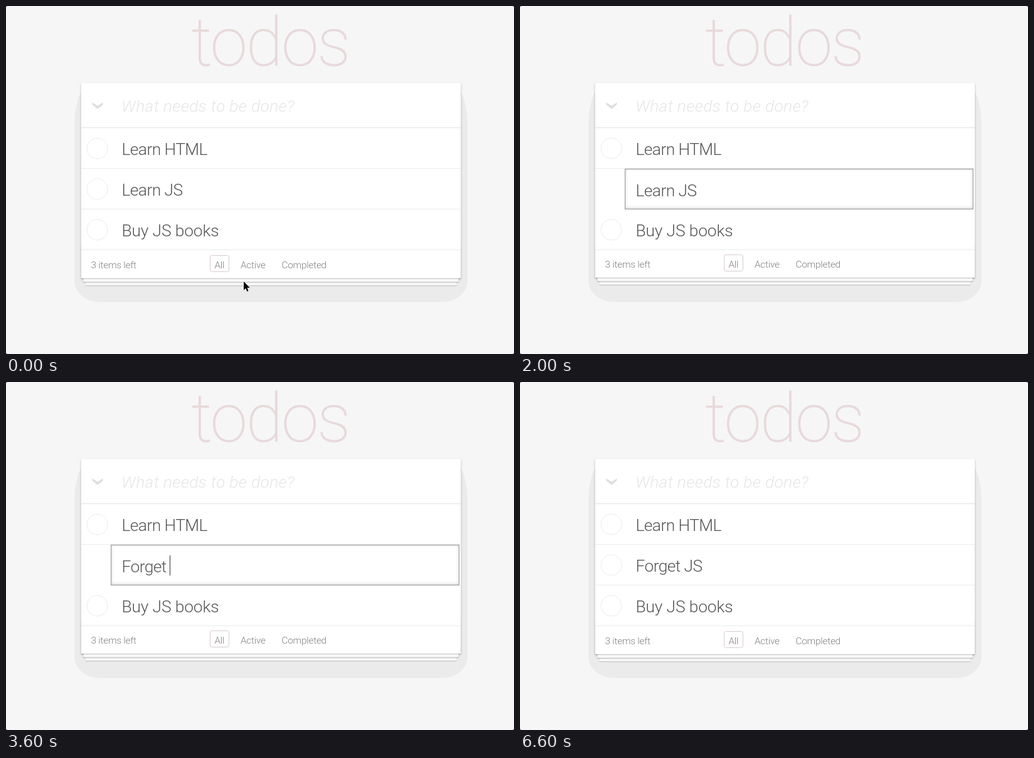
Animation, 810 px wide and 556 px high, one loop 6900 ms. Source, as an HTML page:

```html
<!DOCTYPE html>
<html lang="en">
<head>
<meta charset="utf-8">
<title>todos</title>
<style>
  html, body { margin: 0; width: 100%; height: 100%; overflow: hidden; background: #555; }
  #stage { position: relative; width: 810px; height: 556px; overflow: hidden; background: #f6f6f6; border-radius: 3px; }
  #stage > * { position: absolute; }
  #halo { left: 109px; top: 135px; width: 627px; height: 338px; background: #ebebeb; border-radius: 16px 16px 40px 40px / 60px 60px 34px 34px; }
  #card { left: 120px; top: 123px; width: 605px; height: 312px; background: #fff; box-shadow: 0 2px 4px rgba(0, 0, 0, .2); }
  #sheets {
    position: absolute; left: 0; right: 0; bottom: 0; height: 55px;
    box-shadow: 0 1px 1px rgba(0, 0, 0, .2), 0 9px 0 -3.3px #f8f8f8, 0 10px 1px -3.3px rgba(0, 0, 0, .2),
      0 17.6px 0 -6.6px #f8f8f8, 0 18.7px 2px -6.6px rgba(0, 0, 0, .2);
  }
  #face { position: absolute; inset: 0; background: #fff; }
  #edit {
    box-sizing: border-box; left: 167px; top: 260px; width: 556px; height: 65px; background: #fff;
    border: 1px solid #999; box-shadow: inset 0 -1px 5px rgba(0, 0, 0, .2);
  }
  svg { left: 0; top: 0; }
  text { font-family: Roboto, "Liberation Sans", sans-serif; font-weight: 300; white-space: pre; }
  .title { font-size: 107px; font-weight: 100; letter-spacing: -2px; fill: #e8d9db; stroke: #e8d9db; stroke-width: .8; }
  .hint { font-size: 26.4px; font-style: italic; letter-spacing: .3px; fill: #e6e6e6; }
  .item { font-size: 26.4px; letter-spacing: -.6px; fill: #555; }
  .loose { letter-spacing: -.15px; }
  .foot { font-size: 15.4px; letter-spacing: -.25px; fill: #808080; }
  .line { stroke: #ebebeb; }
  .ring { fill: none; stroke: #ececec; }
</style>
</head>
<body>
<div id="stage">
  <div id="halo"></div>
  <div id="card"><div id="sheets"></div><div id="face"></div></div>
  <svg width="810" height="556">
    <text class="title" x="295" y="95">todos</text>
    <path d="M137.5 154L146 159.5L154.5 154V157.5L146 164.5L137.5 157.5Z" fill="#dedede"/>
    <text class="hint" x="184" y="169">What needs to be done?</text>
    <path d="M120 194.5H725" stroke="#e0e0e0"/>
    <path class="line" d="M120 259.5H725M120 389.5H725"/>
    <path class="line" id="midLine" d="M120 324.5H725"/>
    <circle class="ring" cx="145.5" cy="227.5" r="16.5"/>
    <circle class="ring" id="midRing" cx="145.5" cy="292.5" r="16.5"/>
    <circle class="ring" cx="145.5" cy="357.5" r="16.5"/>
    <text class="item" x="184.5" y="237.5">Learn HTML</text>
    <text class="item loose" x="184.5" y="367.5">Buy JS books</text>
    <g id="footer">
      <text class="foot" x="135.5" y="418.5">3 items left</text>
      <rect x="325.5" y="398.5" width="30" height="26" rx="3" fill="none" stroke="#d9cccc"/>
      <text class="foot" x="332.5" y="418.5">All</text>
      <text class="foot" x="374" y="418.5">Active</text>
      <text class="foot" x="439.5" y="418.5">Completed</text>
    </g>
  </svg>
  <div id="edit"></div>
  <svg width="810" height="556">
    <rect id="mark" height="32" fill="#b9d6fb"/>
    <text class="item" id="label" x="184.5"></text>
    <path id="newCaret" d="M185.5 143V175" stroke="#4d4d4d"/>
    <path id="caret" d="M0 277V309" stroke="#333"/>
    <path id="cross" d="M-7 -7L7 7M7 -7L-7 7" stroke="#b3a6a6" stroke-width="1.3"/>
    <path id="arrow" d="M0 0V14L3.2 11L5.4 16.2L7.7 15.2L5.5 10.2H10Z" stroke="#fff" stroke-width="1.4" paint-order="stroke"/>
  </svg>
</div>
<script>
const LOOP = 6900, STEP = 100;
const EDIT_ON = 1500, EDIT_OFF = 4900;
const $ = id => document.getElementById(id);
const show = (id, on) => { $(id).style.display = on ? '' : 'none'; };
const within = (t, ...spans) => spans.some(([from, to]) => t >= from && t < to);

// time, x, y of the pointer tip
const path = [
  [0, 379, 440], [600, 338, 398], [800, 338, 398], [1300, 244, 288], [5300, 244, 288],
  [5400, 257, 301], [5600, 262, 305], [5700, 262, 305], [6200, 180, 556]
];
// time of each key press and the characters typed by then
const typed = [[2900, 1], [3000, 2], [3100, 3], [3300, 4], [3400, 5], [3500, 6], [3600, 7], [3900, 8], [4000, 9]];

function pointer(t) {
  const i = path.findIndex(p => p[0] > t);
  if (i < 0) return path[path.length - 1].slice(1);
  const [t0, x0, y0] = path[i - 1], [t1, x1, y1] = path[i];
  const k = (t - t0) / (t1 - t0);
  return [x0 + (x1 - x0) * k, y0 + (y1 - y0) * k];
}

function labelAt(t) {
  const last = typed.filter(k => k[0] <= t).pop();
  return last ? 'Forget JS'.slice(0, last[1]) : 'Learn JS';
}

function draw(t) {
  const editing = within(t, [EDIT_ON, EDIT_OFF]);
  const [x, y] = pointer(t);
  const label = $('label');

  show('edit', editing);
  show('midRing', !editing);
  show('midLine', !editing);
  $('card').style.height = (editing ? 311 : 312) + 'px';
  $('footer').setAttribute('transform', `translate(0 ${editing ? -1 : 0})`);

  label.textContent = labelAt(t);
  label.setAttribute('y', editing ? 303.5 : 302.5);

  const all = within(t, [2300, 2900]), gap = within(t, [1400, 1500]);
  show('mark', all || gap);
  $('mark').setAttribute('x', all ? 185 : 246);
  $('mark').setAttribute('y', all ? 277 : 276);
  $('mark').setAttribute('width', all ? 98 : 8);

  show('newCaret', within(t, [100, 600], [1100, 1300]));
  show('caret', within(t, [1500, 2000], [2900, 4500]));
  const end = Math.round(185 + label.getComputedTextLength()) - .5;
  $('caret').setAttribute('transform', `translate(${end} 0)`);

  const row = Math.floor((y - 194.5) / 65);
  show('cross', !editing && t < 6200 && row >= 0 && row < 3);
  $('cross').setAttribute('transform', `translate(691.5 ${228.5 + row * 65})`);
  show('arrow', within(t, [0, EDIT_ON], [5400, 6200]));
  $('arrow').setAttribute('transform', `translate(${x} ${y})`);
}

const start = performance.now();
function tick() {
  const t = (performance.now() - start) % LOOP;
  draw(Math.floor(t / STEP) * STEP);
  requestAnimationFrame(tick);
}
tick();
</script>
</body>
</html>
```
